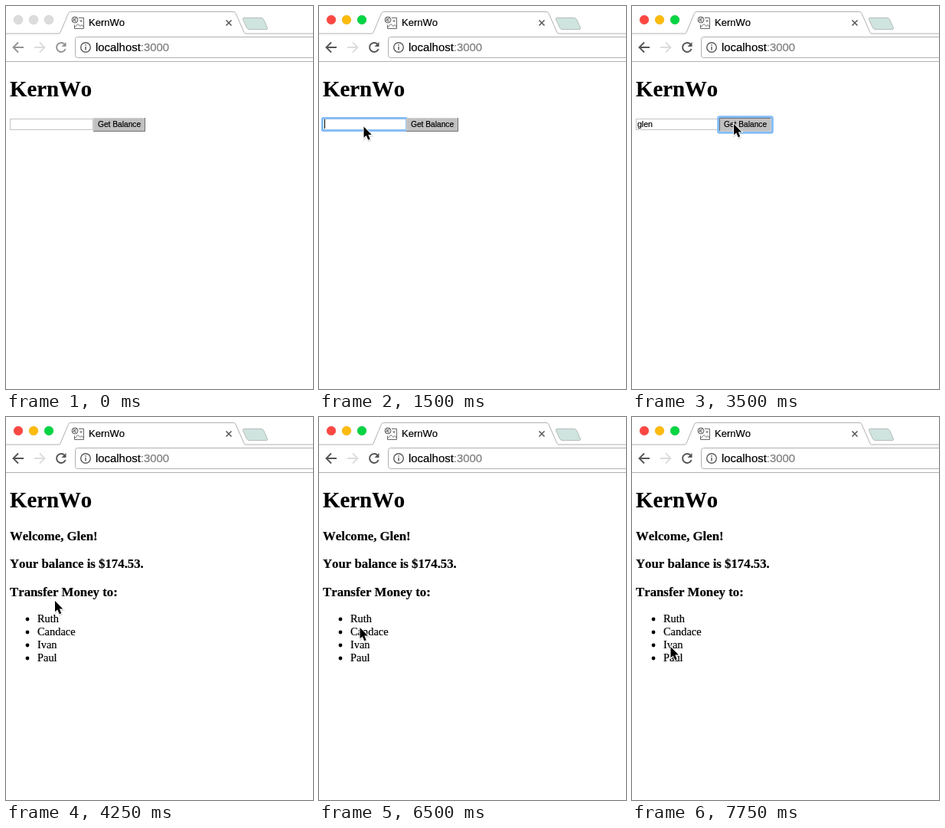
Write an HTML page that moves like this. It is 401 px wide and 500 px high and loops after 8000 ms.

```html
<!DOCTYPE html>
<html lang="en">
<head>
<meta charset="utf-8">
<title>KernWo</title>
<style>
  html, body { margin: 0; width: 100%; height: 100%; overflow: hidden; background: #fff; }
  svg { display: block; width: 401px; height: 500px; }
  text { white-space: pre; font-kerning: none; stroke: #000; stroke-width: .2; }
  .ui { font-family: "Liberation Sans", Arial, sans-serif; }
  .page { font-family: "Liberation Serif", Times, serif; }
  .bold { font-weight: bold; }
  .port { fill: #7c7c7c; stroke: #7c7c7c; }
  .line { fill: none; stroke: #b0b0b0; }
  .ring { fill: none; stroke: #82bcf8; stroke-width: 2.8; }
</style>
</head>
<body>
<svg viewBox="0 0 401 500">
  <rect width="401" height="500" fill="#fff"/>

  <g id="lights" stroke-width=".6">
    <circle cx="16" cy="18" r="5.8"/>
    <circle cx="36" cy="18" r="5.8"/>
    <circle cx="56" cy="18" r="5.8"/>
  </g>

  <path class="line" d="M0 36H69Q70.500 36 71 34.500L81.500 9.500Q82.500 7.500 84.500 7.500H297Q299 7.500 300 9.500L311 34.500Q311.500 36 313 36H401"/>
  <path d="M311 15.500H333Q335.500 15.500 336.500 17.500L341.500 28.500Q342 30.500 340 30.500H318Q315.500 30.500 314.500 28.500L309.500 17.500Q309 15.500 311 15.500Z" fill="#cfe3df" stroke="#b3bdbb"/>

  <g fill="none" stroke="#666">
    <path d="M95 15.500H101.500V29.500H89.500V24.500"/>
    <path d="M89.500 28L94 23.500L97 26.500L99 24.500L101.500 27.500"/>
    <circle cx="98" cy="19.500" r="1"/>
    <circle cx="90" cy="18" r="4" fill="#ddd"/>
    <path d="M87 19.500L90 17.500L92 15M88 15.500L91 20.500"/>
  </g>
  <text class="ui" x="108" y="26" font-size="13">KernWo</text>
  <path d="M287.500 18.500L294.500 25.500M294.500 18.500L287.500 25.500" stroke="#555" stroke-width="1.5"/>

  <g id="nav" fill="none" stroke-width="1.9">
    <path d="M23 54H10M16 47.500L9.500 54L16 60.500"/>
    <path d="M76.600 50A6 6 0 1 0 77.700 56"/>
    <path d="M78.500 47V53H72.500Z" stroke="none" id="reloadTip"/>
  </g>
  <path d="M37 54H50M44 47.500L50.500 54L44 60.500" fill="none" stroke="#dcdcdc" stroke-width="1.8"/>
  <path class="line" d="M402 40.500H93.500Q90.500 40.500 90.500 43.500V64.500Q90.500 67.500 93.500 67.500H402"/>
  <circle cx="104" cy="54" r="6.300" fill="none" stroke="#5a5a5a" stroke-width="1.4"/>
  <path d="M104 53V57.500M104 50.300V51.800" stroke="#5a5a5a" stroke-width="1.5"/>
  <text class="ui" x="117" y="59" font-size="14.9">localhost<tspan class="port">:3000</tspan></text>
  <path class="line" d="M0 72.500H401"/>

  <text class="page bold" x="5" y="118" font-size="28.8">KernWo</text>

  <g id="form">
    <rect x="5.500" y="147.500" width="108" height="14" fill="#fff" stroke="#c4c4c4"/>
    <rect id="inputRing" class="ring" x="4.300" y="146.300" width="110.400" height="16.400" rx="1.500"/>
    <text id="typed" class="ui" x="7" y="158" font-size="10.5"></text>
    <path id="caret" d="M0 148V160" stroke="#000"/>
    <rect x="114" y="146" width="68" height="18" fill="#c0c0c0"/>
    <path id="edgeLight" d="M114.500 164V146.500H182" fill="none"/>
    <path id="edgeDark" d="M114 163.500H181.500V146" fill="none"/>
    <rect id="buttonRing" class="ring" x="112.600" y="144.600" width="70.800" height="20.800" rx="2"/>
    <text class="ui" x="120" y="158" font-size="10.2">Get Balance</text>
  </g>

  <g id="account" class="page">
    <g class="bold" font-size="16.8">
      <text x="5" y="161">Welcome, Glen!</text>
      <text x="5" y="197">Your balance is $174.53.</text>
      <text x="5" y="234">Transfer Money to:</text>
    </g>
    <g id="people" font-size="14.4"></g>
  </g>

  <g id="cursor">
    <path d="M0 0V14.300L3.300 11.400L5.700 17.200L8.200 16.200L5.800 10.600H10.300Z" transform="translate(.5 1.500)" fill="#000" stroke="#000" stroke-width="2" opacity=".14"/>
    <path d="M0 0V14.300L3.300 11.400L5.700 17.200L8.200 16.200L5.800 10.600H10.300Z" fill="#000" stroke="#fff" stroke-width="1.8" paint-order="stroke"/>
  </g>
</svg>
<script>
const LOOP = 8000;
const $ = id => document.getElementById(id);
const show = (id, on) => $(id).setAttribute("display", on ? "inline" : "none");

// [start ms, x, y] of the pointer tip
const pointer = [
  [500, 44.5, 181], [750, 58.5, 157.5], [3250, 130, 147], [3500, 133, 154],
  [4000, 125, 166], [4250, 64, 240], [4500, 54.5, 267], [4750, 54.5, 275],
  [5000, 55, 280.5], [5250, 55.5, 285], [6500, 53.5, 275], [6750, 50, 268],
  [7000, 50, 278.5], [7250, 50, 286.5], [7500, 50, 295], [7750, 50.5, 300]
];
const typing = [[0, "", 7.5], [2250, "gl", 15.5], [2500, "glen", 26.5]];
// times at which the caret switches on or off
const blinks = [1500, 2000, 2250, 3000];

const current = (steps, t) => steps.filter(step => step[0] <= t).pop();

$("people").innerHTML = ["Ruth", "Candace", "Ivan", "Paul"].map((name, i) => {
  const y = 268 + 17 * i;
  return `<circle cx="28" cy="${y - 4}" r="2.400"/><text x="41" y="${y}">${name}</text>`;
}).join("");

function draw(t) {
  const active = t >= 1000;
  const pressed = t >= 3500;
  const loaded = t >= 3750;

  const colors = active ? ["#fc4742", "#fdbb0c", "#04d543"] : Array(3).fill("#dcdcdc");
  const rims = active ? ["#e73f3a", "#e9a908", "#07bd38"] : Array(3).fill("#c6c6c6");
  [...$("lights").children].forEach((light, i) => {
    light.setAttribute("fill", colors[i]);
    light.setAttribute("stroke", rims[i]);
  });
  const ink = active ? "#555" : "#949494";
  $("nav").setAttribute("stroke", ink);
  $("reloadTip").setAttribute("fill", ink);

  show("form", !loaded);
  show("account", loaded);
  show("inputRing", t >= 1500 && !pressed);
  show("buttonRing", pressed);
  $("edgeLight").setAttribute("stroke", pressed ? "#707070" : "#d0d0d0");
  $("edgeDark").setAttribute("stroke", pressed ? "#d0d0d0" : "#707070");

  const [, word, caretX] = current(typing, t);
  $("typed").textContent = word;
  $("caret").setAttribute("transform", `translate(${caretX} 0)`);
  show("caret", blinks.filter(time => time <= t).length % 2 === 1);

  const spot = current(pointer, t);
  show("cursor", Boolean(spot));
  if (spot) $("cursor").setAttribute("transform", `translate(${spot[1]} ${spot[2]})`);
}

const start = performance.now();
function tick() {
  draw((performance.now() - start) % LOOP);
  requestAnimationFrame(tick);
}
tick();
</script>
</body>
</html>
```
